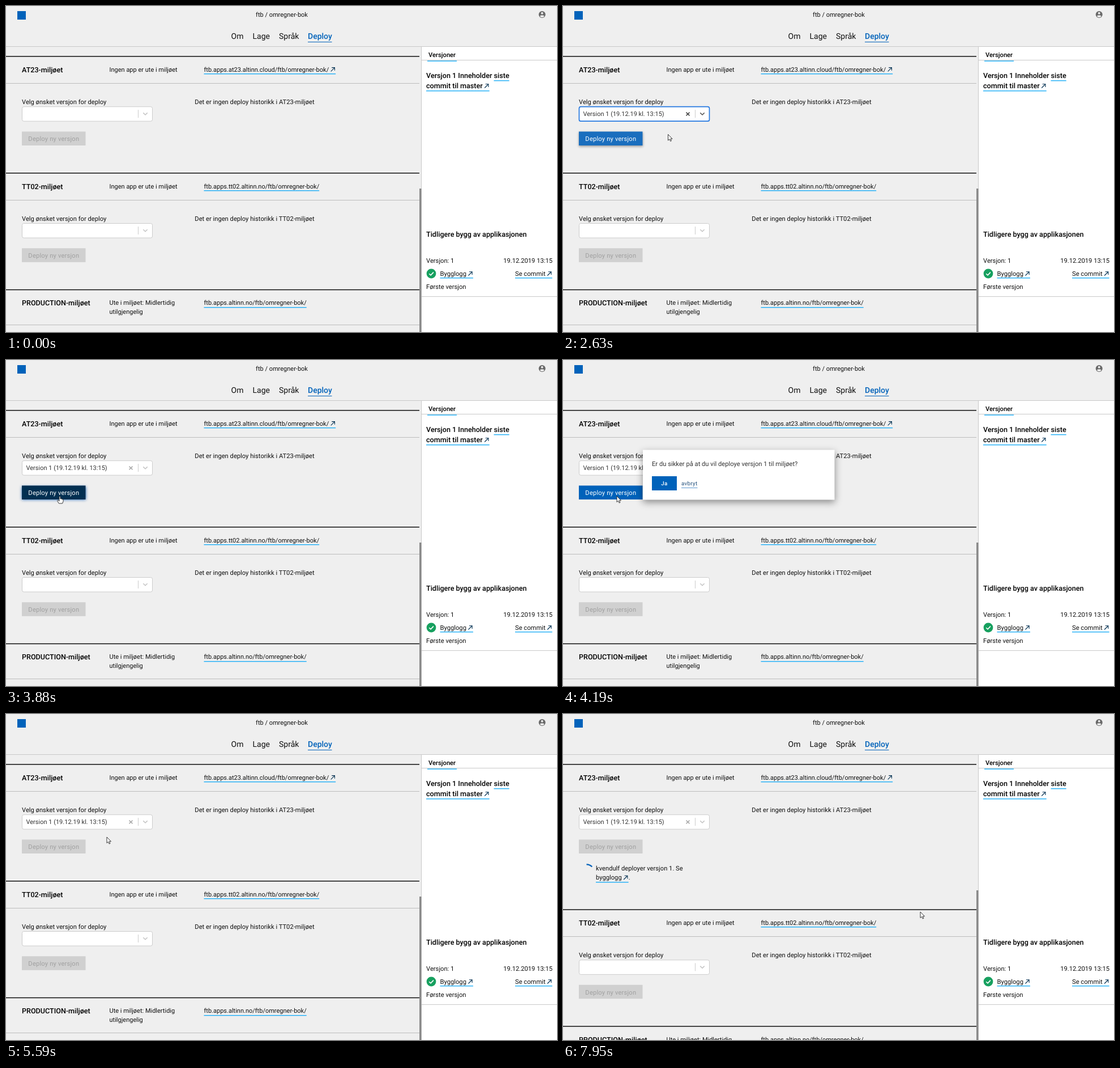
An HTML page with a canvas for the animation above (8 s loop, 973 px wide and 575 px high).

```html
<!DOCTYPE html>
<html lang="nb">
<head>
<meta charset="utf-8">
<title>Deploy</title>
<style>
html, body { margin: 0; width: 100%; height: 100%; overflow: hidden; background: #efefef; }
canvas { display: block; width: 973px; height: 575px; }
</style>
</head>
<body>
<canvas id="stage" width="973" height="575"></canvas>
<script>
const ctx = document.getElementById('stage').getContext('2d');
const LOOP = 8000;
const ORG = 'ftb', APP = 'omregner-bok', USER = 'kvendulf';
const VERSION = 'Version 1 (19.12.19 kl. 13:15)';
const INK = '#111', NAVY = '#022f51', BLUE = '#0062ba', SKY = '#1eaef7', GREY = '#bcbcbc';
const SMALL = 11, BASE = 11.2, LARGE = 12.6, NAV = 14;
const TOP = 88, BLOCK = 205.8, PROGRESS = 50.4;

// The screen only refreshes at these moments.
const TICKS = [0, 440, 610, 780, 950, 1520, 1680, 1980, 2140, 2300, 2460, 2620, 2780, 2940,
  3100, 3240, 3400, 3560, 3720, 3880, 4040, 4190, 4500, 4810, 4970, 5120, 5340, 5460, 5590,
  6200, 6370, 6520, 6670, 6820, 6980, 7130, 7290, 7450, 7610, 7780, 7950];

// Pointer waypoints: time, x, y.
const PATH = [[440, 319, 491], [950, 241, 185], [1680, 241, 185], [2460, 186, 226],
  [3100, 183, 229], [3560, 98, 240], [3880, 95, 240], [4500, 95, 240], [5120, 178, 217],
  [5590, 178, 217], [6200, 215, 275], [7290, 631, 349], [8000, 631, 349]];

const smooth = u => u * u * (3 - 2 * u);
const between = (t, a, b) => t >= a && t < b;

function rect(x, y, w, h, color) {
  ctx.fillStyle = color;
  ctx.fillRect(x, y, w, h);
}

function stroke(points, color, width) {
  ctx.beginPath();
  points.forEach(([x, y]) => ctx.lineTo(x, y));
  ctx.strokeStyle = color;
  ctx.lineWidth = width;
  ctx.stroke();
}

function disc(x, y, r, color) {
  ctx.beginPath();
  ctx.arc(x, y, r, 0, 2 * Math.PI);
  ctx.fillStyle = color;
  ctx.fill();
}

function shadowed(color, blur, dy, draw) {
  ctx.save();
  ctx.shadowColor = color;
  ctx.shadowBlur = blur;
  ctx.shadowOffsetY = dy;
  draw();
  ctx.restore();
}

// Draws text centred vertically on y and returns its width.
function text(s, x, y, { size = BASE, weight = 400, color = INK, align = 'left', spacing = 0 } = {}) {
  ctx.font = `${weight} ${size}px Roboto, sans-serif`;
  ctx.letterSpacing = `${spacing}px`;
  ctx.textAlign = align;
  ctx.fillStyle = color;
  ctx.fillText(s, x, y + size * 0.356);
  return ctx.measureText(s).width;
}

function arrowIcon(x, y, size = 8) {
  const r = x + size, top = y - size / 2;
  stroke([[x + 0.5, top + size - 0.5], [r - 1, top + 1]], NAVY, 1.1);
  stroke([[x + 2, top + 0.8], [r - 0.8, top + 0.8], [r - 0.8, top + size - 2]], NAVY, 1.1);
}

function link(s, x, y, { icon = false, ...style } = {}) {
  let w = text(s, x, y, style);
  if (icon) {
    arrowIcon(x + w + 3, y);
    w += 12;
  }
  rect(x, Math.round(y + (style.size === LARGE ? 8 : 7.2)), w, 1.4, SKY);
  return w;
}

function header() {
  rect(20, 9, 15, 15, BLUE);
  text(`${ORG} / ${APP}`, 487, 15, { size: SMALL, align: 'center' });
  text('Om', 397.5, 53, { size: NAV });
  text('Lage', 435.5, 53, { size: NAV });
  text('Språk', 482, 53, { size: NAV });
  text('Deploy', 533, 53, { size: NAV, weight: 500, color: BLUE });
  rect(533, 63, 42.5, 1, BLUE);
  rect(0, 71, 973, 1, '#c9c9c9');

  disc(946.7, 15, 6, '#696969');
  disc(946.7, 12.7, 1.9, '#efefef');
  ctx.beginPath();
  ctx.ellipse(946.7, 18.1, 3.6, 1.8, 0, 0, 2 * Math.PI);
  ctx.fill();
}

function sidePanel() {
  rect(733, 72, 240, 503, '#fff');
  rect(733, 72, 1, 503, '#c9c9c9');
  text('Versjoner', 746, 86, { weight: 500, color: '#000' });
  rect(734, 95, 239, 1, '#c9c9c9');
  rect(744, 96.4, 52, 1.4, SKY);

  const bold = { size: LARGE, weight: 500, color: '#000' };
  const lead = text('Versjon 1 Inneholder ', 742, 122.5, bold);
  link('siste', 742 + lead, 122.5, bold);
  link('commit til master', 742, 141, { ...bold, icon: true });
  text('Tidligere bygg av applikasjonen', 742, 403, bold);

  text('Versjon: 1', 742, 449);
  text('19.12.2019 13:15', 965, 449, { align: 'right' });
  disc(751, 472, 8.4, '#17a05f');
  stroke([[747.3, 472.2], [750, 474.9], [754.9, 469.6]], '#fff', 1.6);
  link('Bygglogg', 766.5, 472, { icon: true });
  link('Se commit', 899, 472, { icon: true });
  text('Første versjon', 742, 495);
  rect(734, 512, 239, 1, '#c9c9c9');
}

function selectBox(y, { value = '', focus = false, hover = false, caret = false } = {}) {
  ctx.beginPath();
  ctx.roundRect(28.5, y + 0.5, 230, 25.5, 3);
  ctx.fillStyle = '#fff';
  ctx.fill();
  ctx.strokeStyle = focus ? '#2478e0' : hover ? '#b3b3b3' : '#ccc';
  ctx.lineWidth = focus ? 1.7 : 1;
  ctx.stroke();

  const mid = y + 13, icon = focus ? '#555' : '#c4c4c4';
  rect(233, y + 6, 1, 14, '#ccc');
  stroke([[242.3, mid - 1.8], [246, mid + 1.8], [249.7, mid - 1.8]], icon, 1.5);
  if (value) {
    text(value, 35.5, mid, { size: SMALL, color: '#333' });
    const cross = focus ? '#444' : '#aaa';
    stroke([[217.5, mid - 2.6], [223.5, mid + 3.2]], cross, 1.5);
    stroke([[223.5, mid - 2.6], [217.5, mid + 3.2]], cross, 1.5);
  }
  if (caret) rect(35.5, mid - 6.5, 1, 13, '#222');
}

function deployButton(y, state) {
  const fill = { disabled: '#d0d0d0', ready: '#1a6ebe', plain: BLUE, hover: NAVY }[state];
  const paint = () => rect(28, y, 112.5, 24.5, fill);
  if (state === 'ready') shadowed('rgba(0,0,0,.35)', 4, 1.5, paint);
  else if (state === 'hover') shadowed('rgba(0,80,170,.8)', 5, 1, paint);
  else paint();
  text('Deploy ny versjon', 84.3, y + 13,
    { color: state === 'disabled' ? '#a0a0a0' : '#fff', align: 'center', spacing: 0.17 });
}

function environment(y, name, status, url, icon) {
  rect(0, y + 0.2, 730, 1.4, '#000');
  text(`${name}-miljøet`, 28, y + 24.3, { size: LARGE, weight: 500, color: '#000' });
  status.forEach((line, i) => text(line, 182.5, y + 23.8 + i * 16, { size: SMALL }));
  link(`${url}/${ORG}/${APP}/`, 349.5, y + 23.8, { icon, size: SMALL });
  rect(0, Math.round(y + (status.length > 1 ? 62 : 48)), 730, 1, GREY);
}

function deployForm(y, name, select, button) {
  text('Velg ønsket versjon for deploy', 28, y + 81);
  text(`Det er ingen deploy historikk i ${name}-miljøet`, 333.3, y + 81);
  selectBox(y + 89.2, select);
  deployButton(y + 133.5, button);
}

function optionMenu() {
  ctx.beginPath();
  ctx.roundRect(28, 209.5, 231.5, 32, 3);
  ctx.fillStyle = '#fff';
  shadowed('rgba(0,0,0,.35)', 5, 2, () => ctx.fill());
  rect(28, 212, 231.5, 26.5, '#deebff');
  text(VERSION, 36.5, 225.3, { size: SMALL, color: '#222' });
}

function dialog(scale, alpha, hover) {
  ctx.save();
  ctx.globalAlpha = alpha;
  ctx.translate(141, 202);
  ctx.scale(scale, scale * scale);
  ctx.translate(-141, -202);
  shadowed('rgba(0,0,0,.42)', 12, 4, () => rect(141, 158.5, 338.5, 88, '#fff'));
  text('Er du sikker på at du vil deploye versjon 1 til miljøet?', 157, 182.7, { color: '#333' });
  const paint = () => rect(157, 205, 44, 25, hover ? NAVY : BLUE);
  if (hover) shadowed('rgba(0,80,170,.8)', 5, 1, paint);
  else paint();
  text('Ja', 179, 217.5, { size: 9.8, weight: 500, color: '#fff', align: 'center', spacing: 0.28 });
  text('avbryt', 209, 217.3, { size: 9.8, color: '#24517c', spacing: 0.28 });
  rect(209, 225, 28.5, 1, '#5b97cf');
  ctx.restore();
}

// Indeterminate ring: the dash grows, then its tail catches up, while everything rotates.
function spinner(t) {
  const p = (0.68 + (t - 6200) / 1455) % 1;
  const k = smooth((p * 2) % 1);
  const tail = p < 0.5 ? 15 * k : 15 + 110 * k;
  const dash = p < 0.5 ? 1 + 99 * k : 100;
  const spin = p * 2 * Math.PI;
  ctx.beginPath();
  ctx.arc(41.8, 278.2, 12.85, spin + tail / 20.2, spin + Math.min(tail + dash, 126.9) / 20.2);
  ctx.strokeStyle = BLUE;
  ctx.lineWidth = 2.3;
  ctx.stroke();
}

function progress(t) {
  spinner(t);
  text(`${USER} deployer versjon 1. Se`, 58, 272);
  const w = link('bygglogg', 58, 288.5, { icon: true });
  text('.', 58 + w, 288.5);
}

const POINTERS = {
  arrow: 'M0 0V10.6L2.5 8.4L4.2 12.1L5.9 11.3L4.3 7.8H7.5Z',
  hand: 'M-1 1Q0 -.8 1 1V5Q2.4 4 3 5.2Q4.3 4.6 4.7 5.8Q6 5.4 6 7V9.5L4.6 13H-1.6L-4.4 8.6Q-4.4 6.8 -2.6 7.6L-1 9Z'
};

function pointer(t) {
  if (t < PATH[0][0]) return;
  const i = PATH.findIndex(([at]) => at > t);
  const [t0, x0, y0] = PATH[i - 1], [t1, x1, y1] = PATH[i];
  const u = smooth((t - t0) / (t1 - t0));
  const x = x0 + (x1 - x0) * u, y = y0 + (y1 - y0) * u;
  if (between(t, 6200, 6370)) {
    stroke([[x, y - 4.5], [x, y + 4.5]], '#333', 1);
    for (const dy of [-5, 5]) stroke([[x - 2.5, y + dy], [x + 2.5, y + dy]], '#333', 1);
    return;
  }
  const hand = between(t, 3560, 4040) || between(t, 5120, 5460);
  const shape = new Path2D(hand ? POINTERS.hand : POINTERS.arrow);
  ctx.save();
  ctx.translate(x, y);
  ctx.fillStyle = '#fff';
  ctx.fill(shape);
  ctx.strokeStyle = '#222';
  ctx.lineWidth = 0.9;
  ctx.stroke(shape);
  ctx.restore();
}

function buttonState(t) {
  if (t < 2620 || t >= 5460) return 'disabled';
  if (t < 3560) return 'ready';
  return t < 4190 ? 'hover' : 'plain';
}

function render(now) {
  const clock = now % LOOP;
  const t = TICKS.filter(tick => tick <= clock).pop();
  const deploying = t >= 6200;
  const second = TOP + BLOCK + (deploying ? PROGRESS : 0);
  const free = ['Ingen app er ute i miljøet'];

  rect(0, 0, 973, 575, '#efefef');
  header();
  environment(TOP, 'AT23', free, `${ORG}.apps.at23.altinn.cloud`, true);
  deployForm(TOP, 'AT23', {
    value: t >= 2620 ? VERSION : '',
    focus: between(t, 1520, 3880),
    hover: between(t, 950, 1520),
    caret: between(t, 1520, 1980)
  }, buttonState(t));
  environment(second, 'TT02', free, `${ORG}.apps.tt02.altinn.no`);
  deployForm(second, 'TT02', {}, 'disabled');
  environment(second + BLOCK, 'PRODUCTION', ['Ute i miljøet: Midlertidig', 'utilgjengelig'],
    `${ORG}.apps.altinn.no`);
  sidePanel();
  const thumb = deploying ? 311 : 322;
  rect(730, thumb, 3.5, 575 - thumb, '#8b8b8b');

  if (between(t, 1520, 2620)) optionMenu();
  if (deploying) progress(t);
  if (between(t, 4040, 5590)) {
    const opening = t < 4190;
    dialog(opening ? 0.95 : 1, opening ? 0.6 : t < 5460 ? 1 : 0.4, t >= 5120);
  }
  pointer(t);
}

ctx.textRendering = 'geometricPrecision';
const start = performance.now();
function frame() {
  render(performance.now() - start);
  requestAnimationFrame(frame);
}
frame();
</script>
</body>
</html>
```
